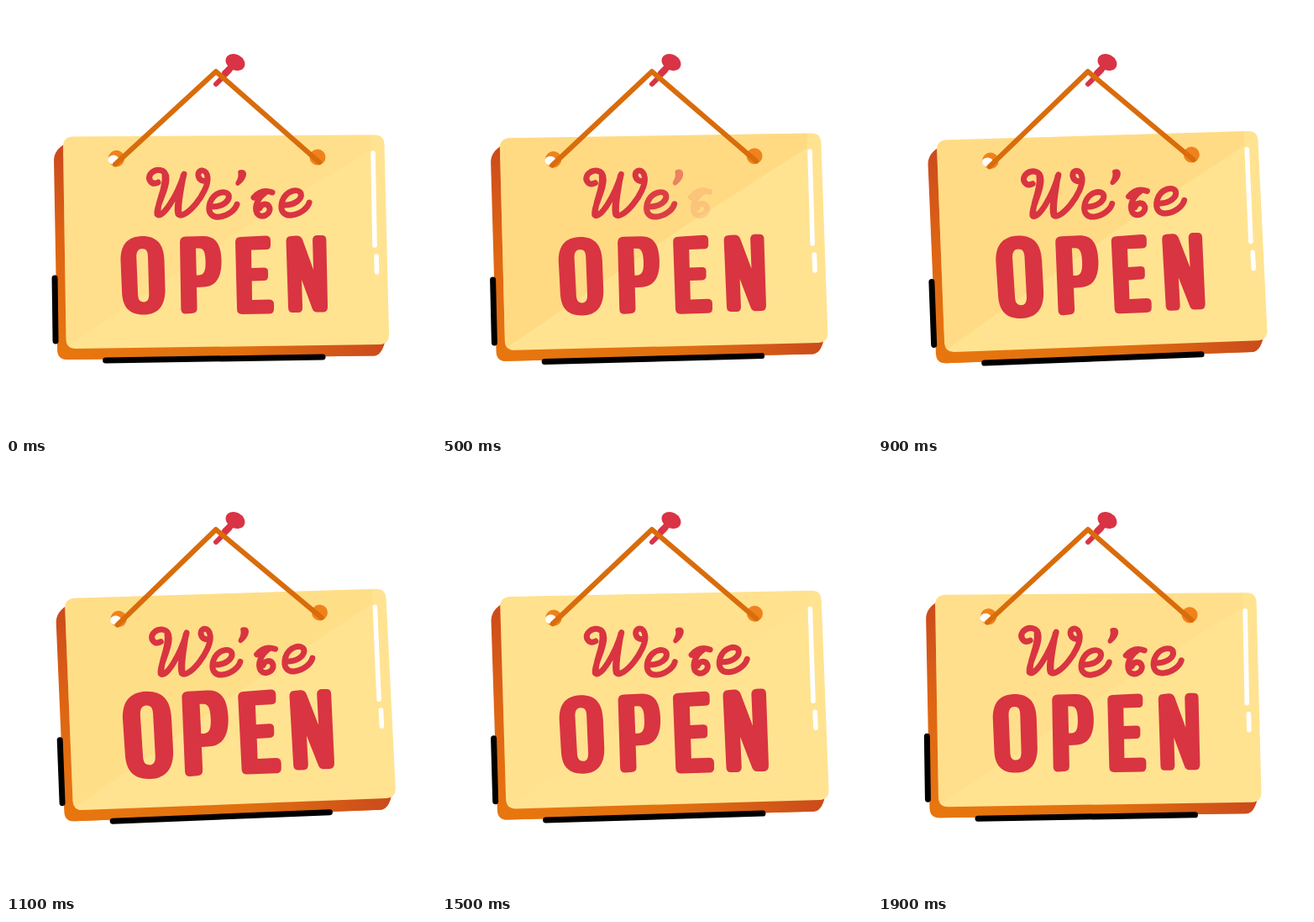
Animation of 512x512 px, one loop 2000 ms. Source, as an HTML page:

```html
<!DOCTYPE html>
<html lang="en">
<head>
<meta charset="utf-8">
<title>We're open</title>
<style>
  html, body { margin: 0; width: 100%; height: 100%; overflow: hidden; background: #fff; }
  svg { display: block; width: 100%; height: 100%; }
  .line { fill: none; stroke-linecap: round; stroke-linejoin: round; }
</style>
</head>
<body>
<svg viewBox="0 0 512 512" role="img" aria-label="We're open">
  <defs>
    <linearGradient id="side" gradientUnits="userSpaceOnUse" x1="60" y1="165" x2="66" y2="420">
      <stop offset="0" stop-color="#cb4a1c"/>
      <stop offset=".45" stop-color="#de6414"/>
      <stop offset="1" stop-color="#e8760f"/>
    </linearGradient>
    <linearGradient id="base" gradientUnits="userSpaceOnUse" x1="70" y1="0" x2="450" y2="0">
      <stop offset="0" stop-color="#e8760f"/>
      <stop offset=".55" stop-color="#e0700f"/>
      <stop offset="1" stop-color="#cb4a1c"/>
    </linearGradient>
    <path id="face" d="M80 155.5 L439 153.5 Q450 153.5 450.5 165 L456 391 Q456 402.5 445 403 L83 408 Q72 408 71.5 397 L68 167 Q68 156 80 155.5Z"/>
    <clipPath id="inFace"><use href="#face"/></clipPath>
  </defs>

  <g class="line" stroke="#d83446">
    <path d="M250 93 L266 77" stroke-width="6"/>
    <path d="M261 80 L268 73" stroke-width="8"/>
  </g>
  <ellipse cx="273" cy="67" rx="12" ry="9.3" transform="rotate(28 273 67)" fill="#d83446"/>

  <g id="sign">
    <path d="M72 163 Q57 171 57 184 L61 409 Q61 421 73 421 L438 416.5 Q447 416 451 400 L80 380Z" fill="url(#side)"/>
    <path d="M66 404 L451 400 Q447 416 438 416.5 L73 421 Q64 421 62 414Z" fill="url(#base)"/>
    <use href="#face" fill="#ffe391"/>
    <path id="shade" d="M60 140 H434 V171 L300 254 L60 414Z" fill="#ffd57c" clip-path="url(#inFace)"/>

    <circle cx="131.5" cy="181.5" r="9.7" fill="#f0821c"/>
    <ellipse cx="128" cy="183" rx="6.5" ry="5.5" fill="#fff"/>
    <circle cx="371" cy="180" r="9.5" fill="#f0821c"/>
    <path class="line" d="M130 188.500 L250 78 L373 186" stroke="#d96c0b" stroke-width="6"/>

    <path class="line" d="M437 175 L439 285 M441 298 L441.500 317" stroke="#fff" stroke-width="5.600"/>
    <path class="line" d="M58 324 L59 399 M118.500 422 L377 418" stroke="#000" stroke-width="7"/>
    <g id="script" class="line" stroke="#d93441" stroke-width="6.500"></g>
    <g id="caps" fill="#d93441" fill-rule="evenodd"></g>
  </g>
</svg>
<script>
const LOOP = 2000, STEP = 100;
const $ = id => document.getElementById(id);
const clamp = v => Math.max(0, Math.min(1, v));
const wave = (t, mid) => (1 + Math.cos(2 * Math.PI * (t - mid) / LOOP)) / 2;

function add(parent, d, attrs = {}) {
  const p = document.createElementNS("http://www.w3.org/2000/svg", "path");
  p.setAttribute("d", d);
  for (const k in attrs) p.setAttribute(k, attrs[k]);
  return parent.appendChild(p);
}

const E = "M246 239 C258 239 267 232 265 225 C262 219 248 221 243 234 C239 247 246 252 254 251 C264 250 273 243 275 236";

const script = [
  "M181 210 C173 214 168 206 172 200 C178 193 191 193 191 206 C191 221 178 238 180 248 C186 254 204 226 212 200 C208 218 202 238 205 248 C212 256 242 222 240 204 C239 193 228 194 229 202 C230 208 235 209 239 208 M189 202 C191 218 179 234 181 247 M211 202 C209 218 204 236 206 247",
  E,
  "M279 198 C286 196 284 205 276 211 C279 206 280 202 279 198Z",
  "M295 228 C301 221 309 219 317 222 M309 222 C300 228 295 239 299 247 C304 254 315 248 314 241 C312 234 304 235 302 241",
  E
].map((d, i) => add($("script"), d, {
  "stroke-width": [7, 7, 5.5, 7, 7][i],
  transform: i === 4 ? "translate(86 -2)" : ""
}));

const caps = [
  [163, "M162 274 C180 274 188 284 188.5 303 L189.5 338 C189.5 357 181 367.5 164 367.5 C146 367.5 138.500 358 138 340 L136.5 304 C136 285 144 274.5 162 274Z M162 289 C157 289 155 293 155.3 300 L157 342 C157 349 159 352.5 164 352.5 C168.5 352.5 170.5 349 170.2 342 L169 299 C169 292 167 289 162 289Z"],
  [232, "M214 274.5 L235 274 C250 274 256 284 256.5 303 C257 324 249 334 236 334.5 L227 335 L227.5 360 Q227.5 366 221 366 L214 366.5 Q208.5 366.5 208.3 361 L207 281 Q207 274.5 214 274.5Z M226 288.5 L226.8 320.5 L230 320.5 C236 320 238 315 237.5 303 C237.3 293 235 288.5 230 288.5Z"],
  [296, "M279 275 L309 273.5 Q315 273.5 315 279 V285 Q315 290 310 290 L292 290.5 L292.3 312 L307 311.5 Q312 311.5 312 316 V322 Q312 327 307 327 L292.7 327.5 L293 350 L313 349.5 Q319 349.5 319 355 V361 Q319 366.5 313 366.5 L281 367 Q275 367 275 361 L273 281 Q273 275 279 275Z"],
  [358, "M339 274 L346 273.5 Q351 273.5 353 278 L366 314 L365 279 Q365 273.5 370 273 H376 Q381 273 381.3 278 L383 358 Q383 364 378 364.5 H370 Q366 364.5 364.5 360 L352 326 L353 359 Q353 365 348 365 H341 Q336 365 336 359 L333.5 280 Q333.5 274 339 274Z"]
].map(([x, d]) => ({ x, el: add($("caps"), d) }));

// Swell and settle, one letter after another
function swell(t, i) {
  const u = clamp(Math.abs(t - 1110 - 77 * i) / 400);
  return 1 + 0.115 * Math.cos(u * Math.PI / 2) ** 2;
}

function draw(t) {
  $("sign").setAttribute("transform", `rotate(${-1.45 * wave(t, 1050)} 250 80)`);
  $("shade").setAttribute("opacity", 0.15 + 0.5 * wave(t, 600));
  script.forEach((el, i) => {
    const o = t < 200 ? 1 - t / 200 : clamp((t - 300 - 60 * i) / 150);
    el.setAttribute("opacity", o);
  });
  caps.forEach(({ x, el }, i) => {
    const s = swell(t, i);
    el.setAttribute("transform", `translate(${x} 320) scale(${s}) translate(${-x} -320)`);
  });
}

const start = performance.now();
function tick() {
  const t = (performance.now() - start) % LOOP;
  draw(Math.floor(t / STEP) * STEP);
  requestAnimationFrame(tick);
}
tick();
</script>
</body>
</html>
```
